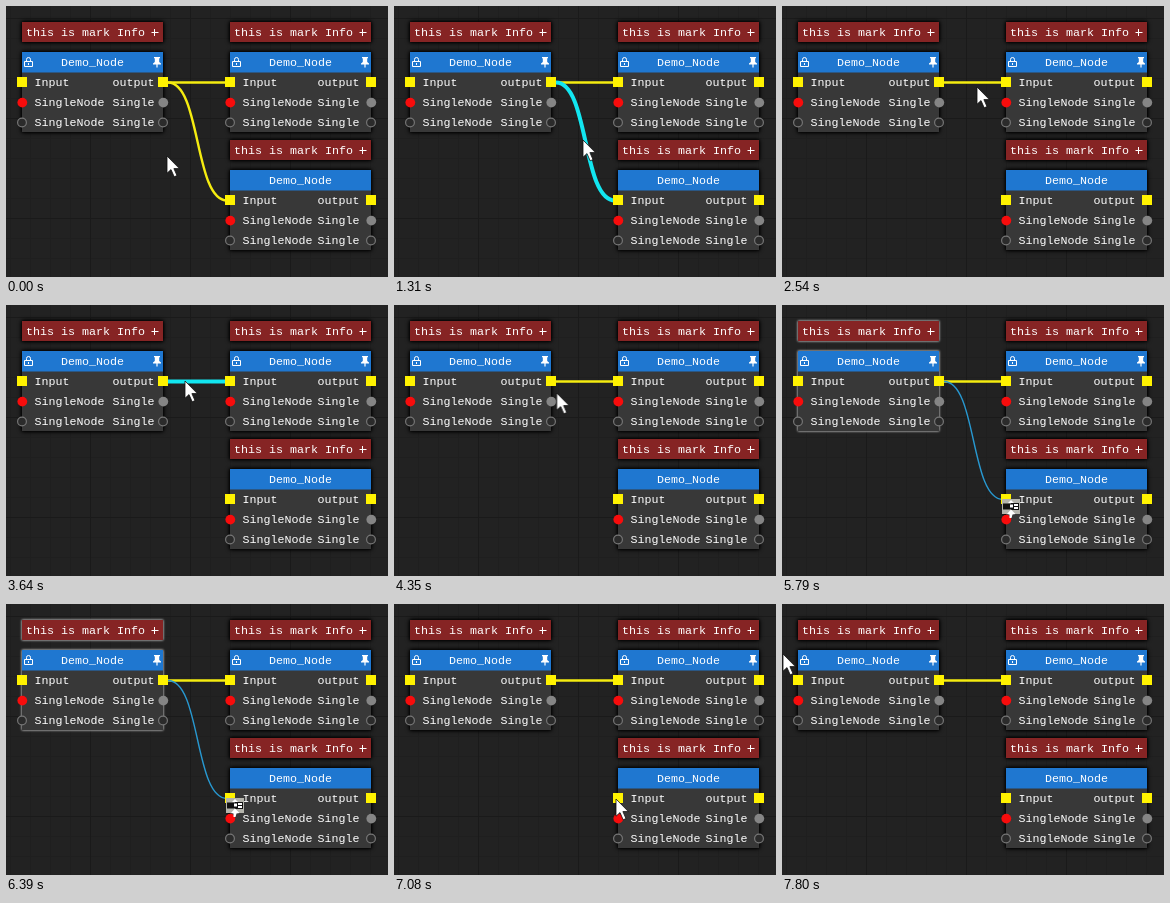
Recreate the animation shown at these times as an HTML page. Size 382 by 271 pixels, loop 8 s.

```html
<!DOCTYPE html>
<html lang="en">
<head>
<meta charset="utf-8">
<title>Node graph</title>
<style>
  html, body { margin: 0; width: 100%; height: 100%; overflow: hidden; background: #222; }
  svg { display: block; width: 382px; height: 271px; }
  text { font: 11.67px "Liberation Mono", "DejaVu Sans Mono", monospace; fill: #fff; white-space: pre; }
  .end { text-anchor: end; }
  .mid { text-anchor: middle; }
  .panel { filter: drop-shadow(0 0 2px #000) drop-shadow(0 0 1px #000); }
  .wire { fill: none; stroke: #f5ec10; stroke-width: 2.4; }
  #loose { fill: none; stroke: #2898d0; stroke-width: 1.4; }

  /* Holds by default; moving legs set their own step count */
  #pointer, #arrow, #carry, #first, #straight, #curved, #loose {
    animation: 8s step-end infinite;
  }
  #pointer { animation-name: travel; }
  #arrow { animation-name: hide-in-drag; }
  #carry { animation-name: show-in-drag; }
  #first { animation-name: select; }
  #straight { animation-name: hover-straight; }
  #curved { animation-name: hover-curved; }
  #loose { animation-name: show-in-drag, pull; }

  @keyframes travel {
    0% { transform: translate(161px, 150px); }
    1.25% { transform: translate(166px, 147px); }
    11.375% { transform: translate(166px, 147px); animation-timing-function: steps(3, start); }
    18.875% { transform: translate(189px, 134px); }
    23.25% { transform: translate(189px, 134px); animation-timing-function: steps(3, start); }
    26.0625% { transform: translate(197px, 80px); }
    31.75% { transform: translate(197px, 80px); animation-timing-function: steps(3, start); }
    39.25% { transform: translate(191px, 83px); }
    42.75% { transform: translate(191px, 83px); animation-timing-function: steps(2, start); }
    48.25% { transform: translate(179px, 76px); }
    51.875% { transform: translate(157px, 77px); animation-timing-function: steps(6, start); }
    67.375% { transform: translate(191px, 143px); animation-timing-function: steps(3, start); }
    74.875% { transform: translate(220px, 194px); }
    88.5% { transform: translate(222px, 195px); animation-timing-function: steps(5, jump-none); }
    99.75%, 100% { transform: translate(1px, 50px); }
  }
  @keyframes pull {
    0%, 51.875% {
      d: path("M162 76.5C195 76.5 124 76 157 76");
      animation-timing-function: steps(6, start);
    }
    67.375% {
      d: path("M162 76.5C195 76.5 150 125 183 125");
      animation-timing-function: steps(3, start);
    }
    74.875%, 100% { d: path("M162 76.5C195 76.5 188 194.5 221 194.5"); }
  }
  @keyframes show-in-drag {
    0%, 88.5%, 100% { visibility: hidden; }
    54.475% { visibility: visible; }
  }
  @keyframes hide-in-drag {
    0%, 88.5%, 100% { visibility: visible; }
    54.475% { visibility: hidden; }
  }
  @keyframes select {
    54.475% { filter: drop-shadow(0 0 1.2px #aaa) drop-shadow(0 0 1.2px #888); }
    88.5% { filter: drop-shadow(0 0 2px #000) drop-shadow(0 0 1px #000); }
  }
  @keyframes hover-straight {
    42.75% { stroke: #12e6f0; stroke-width: 4px; }
    51.875% { stroke: #f5ec10; stroke-width: 2.4px; }
  }
  @keyframes hover-curved {
    0% { visibility: visible; }
    16.375% { stroke: #12e6f0; stroke-width: 4px; }
    23.25%, 100% { visibility: hidden; stroke: #f5ec10; stroke-width: 2.4px; }
  }
</style>
</head>
<body>
<svg viewBox="0 0 382 271">
  <defs>
    <pattern id="grid" x="84" y="12" width="20" height="20" patternUnits="userSpaceOnUse">
      <path d="M.5 0V20M0 .5H20" stroke="#1f1f1f"/>
    </pattern>
    <pattern id="blocks" x="84" y="12" width="100" height="100" patternUnits="userSpaceOnUse">
      <path d="M.5 0V100M0 .5H100" stroke="#1a1a1a"/>
    </pattern>
    <g id="panel">
      <rect x="16" y="16" width="141" height="20" fill="#862424"/>
      <rect x="16" y="46" width="141" height="80" fill="#383838"/>
      <rect x="16" y="46" width="141" height="20.5" fill="#1f77d0"/>
    </g>
    <g id="content">
      <text x="20" y="30">this is mark Info</text>
      <path d="M145.5 26.5H152.5M148.5 23V30" stroke="#fff"/>
      <text class="mid" x="86.5" y="60">Demo_Node</text>
      <text x="28.5" y="80">Input</text>
      <text x="28.5" y="100">SingleNode</text>
      <text x="28.5" y="120">SingleNode</text>
      <path d="M11 71h10v10h-10zM152 71h10v10h-10z" fill="#fff200"/>
      <circle cx="16.3" cy="96.6" r="4.9" fill="#f80c0c"/>
      <circle cx="157.3" cy="96.6" r="4.9" fill="#858585"/>
      <g fill="#2b2b2b" stroke="#777" stroke-width="1.2">
        <circle cx="16" cy="116.5" r="4.4"/>
        <circle cx="157" cy="116.5" r="4.4"/>
      </g>
    </g>
    <g id="outputs" class="end">
      <text x="148.5" y="80">output</text>
      <text x="148.5" y="100">Single</text>
      <text x="148.5" y="120">Single</text>
    </g>
    <g id="icons">
      <path d="M18.5 55.5h8v5h-8zM20.5 55v-1.5a2 2 0 0 1 4 0v1.5M22.5 57v2" fill="none" stroke="#fff"/>
      <path d="M148 51h6v1.3h-.8v3.7l1.8 1.5v1h-3.4v3h-1.2v-3h-3.4v-1l1.8-1.5v-3.7h-.8z" fill="#fff"/>
    </g>
  </defs>

  <rect width="382" height="271" fill="#222"/>
  <rect width="382" height="271" fill="url(#grid)"/>
  <rect width="382" height="271" fill="url(#blocks)"/>

  <use id="first" class="panel" href="#panel"/>
  <use class="panel" href="#panel" x="208"/>
  <use class="panel" href="#panel" x="208" y="118"/>

  <path id="straight" class="wire" d="M162 76.5H221"/>
  <path id="curved" class="wire" d="M162 76.5C195 76.5 188 194.5 221 194.5"/>
  <path id="loose"/>

  <use href="#content"/>
  <use href="#content" x="208"/>
  <use href="#content" x="208" y="118"/>
  <use href="#outputs"/>
  <use href="#outputs" x="205"/>
  <use href="#outputs" x="205" y="118"/>
  <use href="#icons"/>
  <use href="#icons" x="208"/>

  <g id="pointer">
    <path id="arrow" d="M0 0V17.2L4 13.6L7.2 20.8L10 19.6L6.9 12.6H12.4Z" fill="#fff" stroke="#111" stroke-width=".8"/>
    <g id="carry">
      <rect width="18" height="15" fill="#b4b4ac"/>
      <path d="M1 4.5h8v6h-8zM9 4h8v7h-8z" fill="#111"/>
      <path d="M8 5.5h3v3h-3zM12 5h4v2h-4zM12 8h4v2h-4zM6 4L9 1L12 4z" fill="#fff"/>
      <path d="M5 15L9 10.5L13.5 15L10.5 15.5L9.5 19H7.5V15.5Z" fill="#fff"/>
    </g>
  </g>
</svg>
</body>
</html>
```
